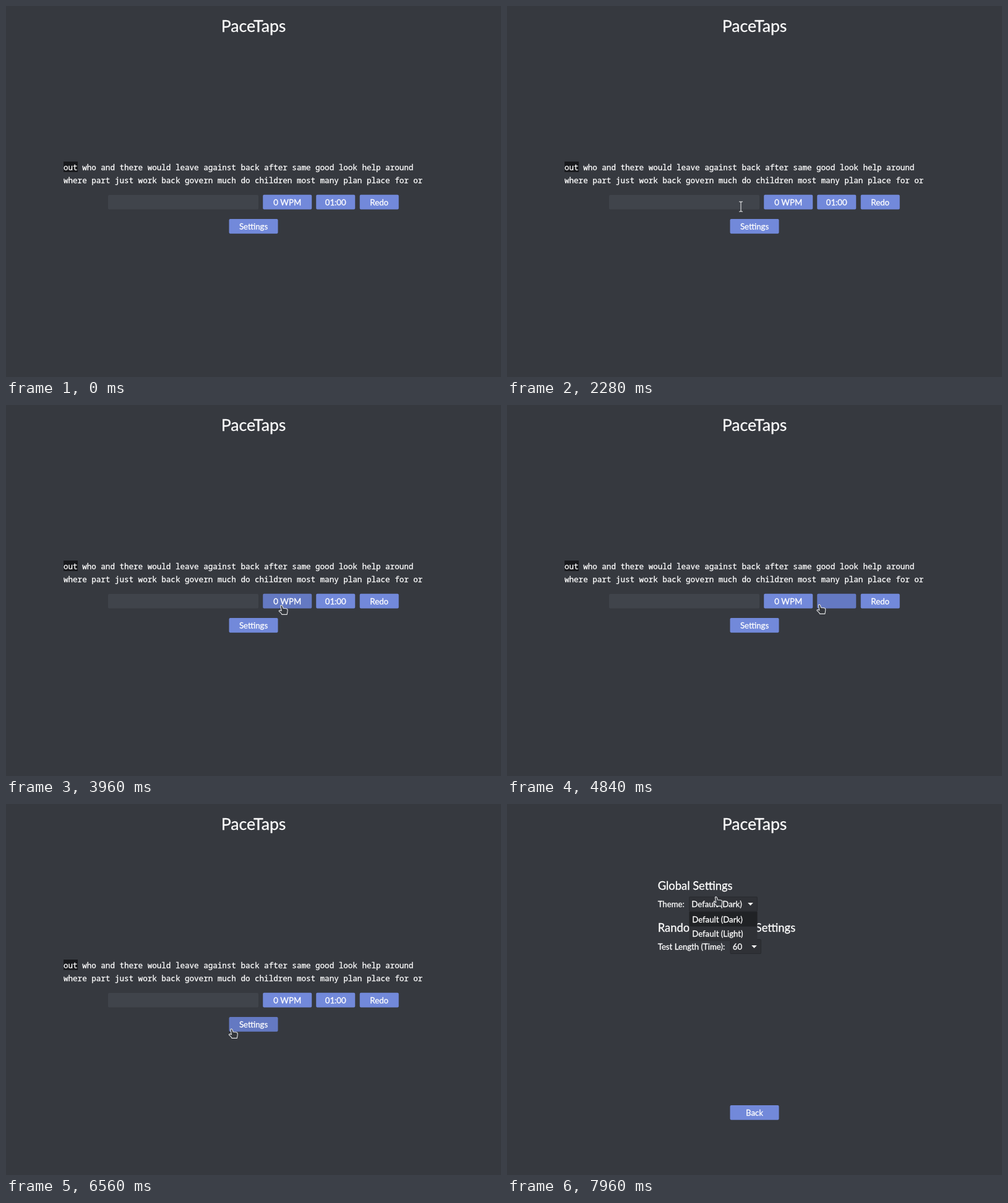
Recreate the animation shown at these times as an HTML page with a canvas. Size 800 px wide and 601 px high, loop 8 s.

```html
<!DOCTYPE html>
<html lang="en">
<head>
<meta charset="utf-8">
<title>Typing practice</title>
<style>
  html, body { margin: 0; width: 100%; height: 100%; overflow: hidden; background: #36393f; }
  canvas { display: block; }
</style>
</head>
<body>
<canvas id="stage" width="800" height="601"></canvas>
<script>
const ctx = document.getElementById('stage').getContext('2d');
const LOOP = 8000, ENTER = 840, SWAP = 6600, OPEN = 7840;
const HIDE_TIME = 4780, SHOW_TIME = 5240, FADE = 160;
const UI = 'Lato, sans-serif', MONO = '"Noto Sans Mono", monospace';
const BODY = 13.2, HEADING = 18.36, TITLE = 26.67;
const COLOR = {
  bg: '#36393f', field: '#40444b', text: '#ffffff', mark: '#18191c',
  select: '#2f3136', edge: '#282a2e', chosen: '#202225'
};

const WORDS = [
  'out who and there would leave against back after same good look help around',
  'where part just work back govern much do children most many plan place for or'
];

// Each box is x, y, width, height.
const INPUT = [165, 306, 243, 23.5];
const BUTTONS = {
  wpm: [415.2, 305.8, 79, 23.8],
  time: [501.2, 305.8, 63, 23.8],
  redo: [571.7, 305.8, 63, 23.8],
  settings: [360.5, 345, 79, 23.8]
};
const BACK = [360.5, 488, 79, 23.8];
const THEME = [294, 150, 111, 24];
const LENGTH = [360.5, 219, 50.5, 24];

// Pointer path: time, x, y.
const PATH = [
  [840, 15, 424], [1140, 115, 402], [1440, 233, 372], [1640, 298, 348],
  [1900, 345, 327], [2280, 378, 325], [2440, 378, 325], [2880, 417, 325],
  [3040, 417, 325], [3440, 421, 326], [3840, 436, 325], [4240, 474, 325],
  [4640, 505, 324], [5640, 505, 324], [5800, 494, 326], [5960, 484, 329],
  [6000, 480, 332], [6240, 408, 354], [6440, 364.5, 365], [7280, 364.5, 365],
  [7480, 356, 270], [7720, 338, 151], [8000, 338, 151]
];

function slope(i, k) {
  if (i === 0 || i === PATH.length - 1) return 0;
  const [a, b, c] = [PATH[i - 1], PATH[i], PATH[i + 1]];
  const before = (b[k] - a[k]) / (b[0] - a[0]);
  const after = (c[k] - b[k]) / (c[0] - b[0]);
  return before * after <= 0 ? 0 : 2 * before * after / (before + after);
}

function pointer(t) {
  let i = 0;
  while (i < PATH.length - 2 && t > PATH[i + 1][0]) i++;
  const a = PATH[i], b = PATH[i + 1], span = b[0] - a[0];
  const u = Math.min(1, Math.max(0, (t - a[0]) / span));
  const ease = u * u * (3 - 2 * u);
  return [1, 2].map(k =>
    a[k] + (b[k] - a[k]) * ease +
    span * u * (1 - u) * ((1 - u) * slope(i, k) - u * slope(i + 1, k)));
}

const inside = ([px, py], [x, y, w, h]) => px >= x && px <= x + w && py >= y && py <= y + h;

// Share of the last moments that the pointer spent over the box.
function hover(t, box) {
  let hits = 0;
  for (let i = 0; i < 8; i++) {
    const at = t - i * FADE / 8;
    if (at >= ENTER && inside(pointer(at), box)) hits++;
  }
  return hits / 8;
}

// A hairline stroke gives the letters their slightly heavier look.
function text(str, x, y, size, align = 'left', family = UI, weight = 400) {
  ctx.font = `${weight} ${size}px ${family}`;
  ctx.textAlign = align;
  ctx.fillStyle = ctx.strokeStyle = COLOR.text;
  ctx.lineWidth = 0.3;
  ctx.lineJoin = 'round';
  ctx.fillText(str, x, y);
  ctx.strokeText(str, x, y);
}

function panel([x, y, w, h], fill, radius = 2) {
  ctx.fillStyle = fill;
  ctx.beginPath();
  ctx.roundRect(x, y, w, h, radius);
  ctx.fill();
}

function button(box, label, heat = 0) {
  const mix = (a, b) => Math.round(a + (b - a) * heat);
  panel(box, `rgb(${mix(114, 100)},${mix(137, 121)},${mix(218, 194)})`);
  text(label, box[0] + box[2] / 2, box[1] + 16.7, BODY, 'center');
}

function select(box, label) {
  const [x, y, w, h] = box;
  panel(box, COLOR.edge);
  panel([x + 1, y + 1, w - 2, h - 2], COLOR.select, 1);
  text(label, x + 4.3, y + 16.8, BODY);
  const ax = x + w - 11.5, ay = y + 10;
  ctx.beginPath();
  ctx.moveTo(ax - 4.3, ay);
  ctx.lineTo(ax + 4.3, ay);
  ctx.lineTo(ax, ay + 4.6);
  ctx.fill();
}

function drawTest(t) {
  panel([93, 252, 23, 17], COLOR.mark, 0);
  WORDS.forEach((line, i) => text(line, 93, 265.7 + i * 21, 12.57, 'left', MONO, 500));
  panel(INPUT, COLOR.field);
  const timeHidden = t >= HIDE_TIME && t < SHOW_TIME;
  const labels = { wpm: '0 WPM', time: timeHidden ? '' : '01:00', redo: 'Redo', settings: 'Settings' };
  for (const key in BUTTONS) button(BUTTONS[key], labels[key], hover(t, BUTTONS[key]));
}

function drawSettings(t) {
  text('Global Settings', 243.7, 138.5, HEADING);
  text('Theme:', 243.7, 166.8, BODY);
  text('Random Generator Settings', 243.7, 207.3, HEADING);
  text('Test Length (Time):', 243.7, 235.8, BODY);
  select(THEME, 'Default (Dark)');
  select(LENGTH, '60');
  button(BACK, 'Back');
  if (t < OPEN) return;
  panel([294.5, 174, 110, 48], COLOR.select, 0);
  panel([294.5, 174.5, 110, 24], COLOR.chosen, 0);
  text('Default (Dark)', 299.2, 191.5, BODY);
  text('Default (Light)', 299.2, 214.5, BODY);
}

const ARROW = new Path2D('M.5 .5V13.6L3.2 11.6 5 15 8 14 7 10.6 9.2 9.2Z');
const HAND = new Path2D('M-1.6 .2Q0 -1.6 1.3 .5L2.6 4.2 7.6 4.8Q10 5.3 9.8 8L9.4 11.2 8.8 14.4H.6L-1 11.8 -4 9.2Q-4.4 7.4 -2.4 7.6L-.2 8.6Z');
const BEAM = new Path2D('M-3 -8H-1L0 -7 1 -8H3M0 -7V7M-3 8H-1L0 7 1 8H3');

function drawPointer(t) {
  if (t < ENTER) return;
  const at = pointer(t);
  const targets = t < SWAP ? Object.values(BUTTONS) : [THEME, LENGTH, BACK];
  const typing = t < SWAP && inside(at, INPUT);
  const shape = typing ? BEAM : targets.some(box => inside(at, box)) ? HAND : ARROW;
  ctx.save();
  ctx.translate(...at);
  ctx.lineJoin = 'round';
  if (!typing) {
    ctx.fillStyle = '#34373c';
    ctx.fill(shape);
  }
  ctx.strokeStyle = '#e4e5e7';
  ctx.lineWidth = 1.1;
  ctx.stroke(shape);
  ctx.restore();
}

function draw(t) {
  ctx.fillStyle = COLOR.bg;
  ctx.fillRect(0, 0, 800, 601);
  text('PaceTaps', 400, 42, TITLE, 'center');
  if (t < SWAP) drawTest(t);
  else drawSettings(t);
  drawPointer(t);
}

const start = performance.now();
function frame() {
  draw((performance.now() - start) % LOOP);
  requestAnimationFrame(frame);
}
frame();
</script>
</body>
</html>
```
